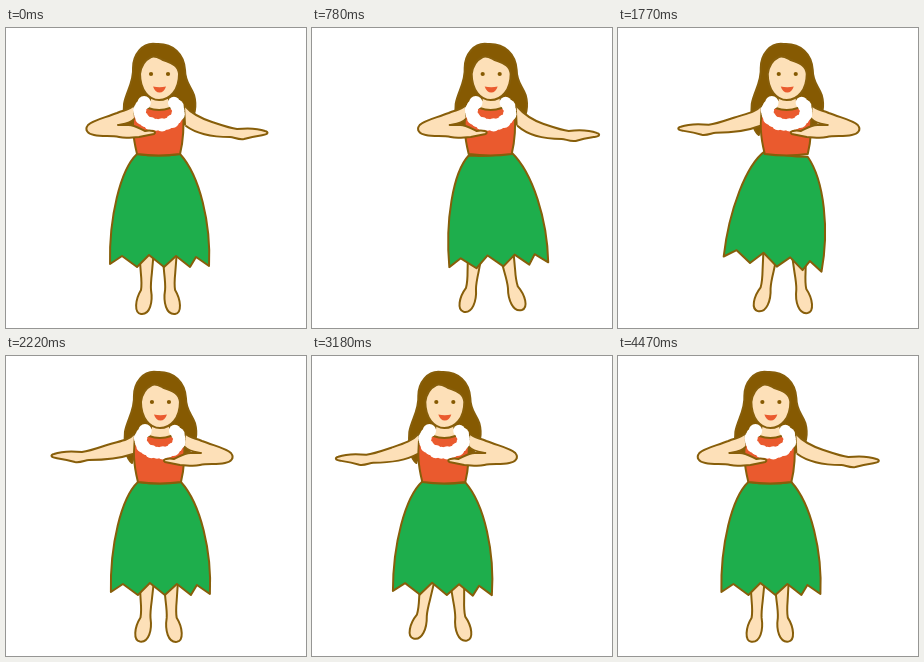
An HTML page for the animation above (4.5 s loop, 300 px wide and 300 px high).

```html
<!DOCTYPE html>
<html>
<head>
<meta charset="utf-8">
<title>Hula dancer</title>
<style>
  html, body { margin: 0; width: 100%; height: 100%; overflow: hidden; background: #fff; }
  svg { display: block; width: 300px; height: 300px; }
  .line { stroke: #875e0a; stroke-width: 2; stroke-linejoin: round; stroke-linecap: round; }
  .skin { fill: #fde0b8; }
  .hair { fill: #865a02; }
  .top { fill: #ea5a2e; }
  .skirt { fill: #1eae4c; }
</style>
</head>
<body>
<svg viewBox="0 0 300 300">
  <defs>
    <path id="leg" class="line skin" d="M-10 210C-10 244-6 250-8 262C-14 272-15 285-8 286C1 287 4 274 2 262C1 250 5 240 5 210Z"/>
  </defs>
  <!-- Body drawn around x = 0 -->
  <g id="body">
    <path class="hair line" d="M-3 16C-17 14-26 27-26 40C-25 54-33 64-35 76C-36 90-34 102-28 107L-20 80L22 97L29 96C36 89 38 78 35 67C31 57 26 54 26 42C25 26 14 15-3 16Z"/>
    <g id="legL"><use href="#leg" x="-10"/></g>
    <g id="legR"><use href="#leg" transform="translate(8) scale(-1 1)"/></g>
    <path id="skirt" class="skirt line" d="M-22 126C-39 142-50 190-49 236L-37 228L-22 239L-10 227L5 239L17 228L31 239L37 229L50 238C52 196 41 148 21 126Q0 129-22 126Z"/>
    <path class="skin line" d="M-9 64L-9 72C-13 76-20 77-26 80L-24 97L24 97L26 80C20 77 14 76 10 72L10 64Z"/>
    <path class="top line" d="M-24 80L-11 80Q0 84 11 80L24 80C25 95 25 110 21 126Q0 129-22 126C-26 110-28 95-24 80Z"/>
    <path class="skin line" d="M-8 29C-14 32-18 37-19 46C-19 62-10 72 0 72C11 72 20 62 20 46C19 36 11 35 4 32C0 30-4 27-8 29Z"/>
    <g class="hair"><circle cx="-8" cy="46" r="2.1"/><circle cx="9" cy="46" r="2.1"/></g>
    <path class="top" d="M-6 58.5Q.5 60 7 58.5Q5 64.5 .5 64.5Q-4 64.5-6 58.5Z"/>
    <g id="lei" fill="#fff"></g>
    <g id="arms">
      <path class="skin line" d="M-26 78C-29 82-36 82-42 85C-55 90-66 92-71 97C-75 102-71 106-65 107C-56 109-48 107-40 109C-32 111-27 109-20 109L-5 106C-1 103-9 102-14 103C-19 101-25 96-32 97L-41 97C-36 96-28 95-25 91"/>
      <path id="reach" class="skin line"/>
    </g>
  </g>
</svg>
<script>
  const LOOP = 4500, QUARTER = LOOP / 4;
  const el = id => document.getElementById(id);
  const set = (id, name, value) => el(id).setAttribute(name, value);
  const tri = u => 1 - Math.abs(2 * u - 1);
  const deg = rad => rad * 180 / Math.PI;

  // Lei: an open ring of overlapping blossoms
  for (let i = 0; i < 16; i++) {
    const a = -.7 + i * 4.54 / 15;
    const x = 19.5 * Math.cos(a), y = 83.5 + 13.5 * Math.sin(a);
    el('lei').innerHTML += `<circle cx="${x}" cy="${y}" r="${6 + i % 2 * .7}"/>`;
  }

  function reachPath(y) {
    const p = n => y + n;
    return `M26 78C32 85 41 ${p(-14)} 53 ${p(-10)}C62 ${p(-7)} 70 ${p(-4)} 78 ${p(-3)}` +
      `C88 ${p(-4)} 98 ${p(-4)} 106 ${p(-1)}C110 ${p(0)} 109 ${p(2.5)} 104 ${p(3)}` +
      `C97 ${p(4)} 93 ${p(4.5)} 85 ${p(7)}C79 ${p(8)} 75 ${p(5)} 71 ${p(5)}` +
      `C57 ${p(5)} 39 ${p(3)} 27 98`;
  }

  function draw(now) {
    const t = now % LOOP;
    const goingRight = t < QUARTER || t >= 3 * QUARTER;
    const dir = goingRight ? 1 : -1;

    const side = t < LOOP / 2 ? 37 : -25;
    const x = 153 + side * tri(t % (LOOP / 2) / (LOOP / 2));
    set('body', 'transform', `translate(${x})`);

    // Each quarter holds two side steps and one hip sway
    const u = t % QUARTER / QUARTER;
    const sway = dir * 20 * tri(u) ** 2;
    set('skirt', 'transform', `rotate(${-deg(Math.atan(sway / 108))} 0 127)`);

    const spread = 5 * tri(u) + 11 * tri(u * 2 % 1);
    const lean = dir * 3 * Math.min(1, 3 * tri(u));
    const swing = d => `rotate(${-deg(Math.atan(d / 85))} 0 195)`;
    set('legL', 'transform', swing(lean - spread));
    set('legR', 'transform', swing(lean + spread));

    const v = (t + QUARTER) % (LOOP / 2) / (LOOP / 2);
    set('reach', 'd', reachPath((goingRight ? 104 : 99) + 4 * (2 * v - 1) ** 2));
    set('arms', 'transform', `scale(${dir} 1)`);
  }

  const start = performance.now();
  (function tick() {
    draw(performance.now() - start);
    requestAnimationFrame(tick);
  })();
</script>
</body>
</html>
```
